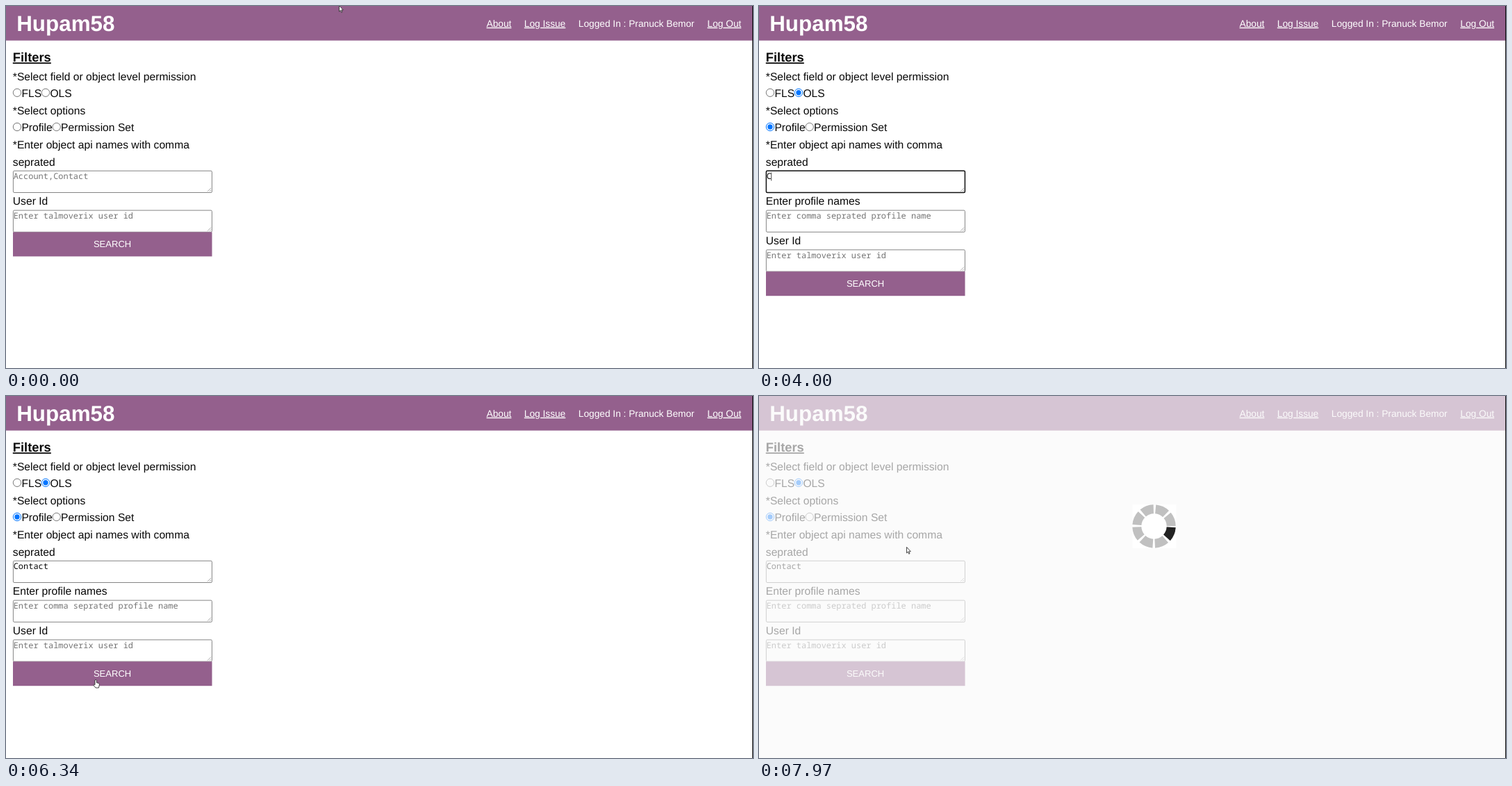
An HTML page that plays this animation: 1075 px wide and 521 px high, repeating every 8 s.

```html
<!DOCTYPE html>
<html lang="en">
<head>
<meta charset="utf-8">
<title>Permission filters</title>
<style>
  html, body { margin: 0; width: 100%; height: 100%; overflow: hidden; background: #fff; }
  svg { display: block; font: 15.66px "Liberation Sans", Arial, sans-serif; fill: #080808; text-rendering: geometricPrecision; }
  .title { font-size: 31.4px; font-weight: bold; fill: #fff; }
  .nav { font-size: 13.71px; fill: #fff; }
  .heading { font-size: 18.33px; font-weight: bold; }
  .link { text-decoration: underline; }
  .button { font-size: 13.05px; fill: #fff; text-anchor: middle; }
  .mono { font: 11.97px "Noto Sans Mono", "DejaVu Sans Mono", monospace; fill: #757575; }
  .typed { fill: #080808; }
  .box { fill: #fff; stroke: #858585; }
  .focus .box { stroke: #101010; stroke-width: 1.5; }
  .grip { stroke: #999; stroke-width: .8; }
  .purple { fill: #94608d; }
  .radio { fill: #fff; stroke: #767676; }
  .radio.hover { stroke: #4f4f4f; }
  .radio.on { stroke: #0075ff; }
  .radio.on.hover { stroke: #005cc8; }
  .dot { fill: #0075ff; visibility: hidden; }
  .on + .dot { visibility: visible; }
  .on.hover + .dot { fill: #005cc8; }
  #pointer path { fill: #fff; stroke: #333; stroke-width: .9; stroke-linejoin: round; }
  #pointer #beam { fill: none; }
</style>
</head>
<body>
<svg width="1075" height="521" viewBox="0 0 1075 521">
  <rect class="purple" width="1074" height="49.7"/>
  <text class="title" x="15.2" y="36.2">Hupam58</text>
  <g class="nav">
    <text class="link" x="691.5" y="29.8">About</text>
    <text class="link" x="745.8" y="29.8">Log Issue</text>
    <text x="823.8" y="29.8">Logged In : Pranuck Bemor</text>
    <text class="link" x="1009.3" y="29.8">Log Out</text>
  </g>
  <text class="heading link" x="9.8" y="80.3">Filters</text>
  <g id="form"></g>
  <path id="caret" d="M0 239.5V251.5" stroke="#333" stroke-width=".9"/>

  <g id="loading">
    <rect width="1074" height="521" fill="#f9f9f9" opacity=".66"/>
    <rect x="537.5" y="156" width="63" height="63" fill="#fff"/>
    <g transform="translate(568.5 187.5)" fill="none" stroke-width="13" stroke-dashoffset="-1.5">
      <circle r="24.7" stroke="#c0c0c0" stroke-dasharray="16.4 3"/>
      <circle id="spoke" r="24.7" stroke="#222" stroke-dasharray="16.4 200"/>
    </g>
  </g>
  <rect x="1074" width="1" height="521"/>

  <g id="pointer">
    <path id="arrow" d="M.5 .5V9L2.4 7.2 3.7 10.3 5 9.7 3.7 6.8H6.3Z"/>
    <path id="hand" d="M1 1Q2.2-.4 3.4 1V4.6L6.6 5.4Q7.8 6.4 7.2 8.6L6.4 12H2L-1.2 8Q-1 6.4 1 7.6Z"/>
    <path id="beam" d="M-1.5-5H1.5M0-5V5M-1.5 5H1.5"/>
  </g>
</svg>
<script>
const LOOP = 8000, STEP = 95;
const LEFT = 9.8, LINE = 24.63, BLOCK = 56.8, CHAR = 7.18;
const FIELD_TOP = 236.8, FIELD_HEIGHT = 32;
const ENTRY = "Contact";

// When things happen, in ms
const PICK_OLS = 1675, PICK_PROFILE = 2320, FOCUS = 2910, TYPE = 4000, TYPE_ON = 4600,
  LAST_KEY = 5170, CARET_OFF = 5670, POINTER_BACK = 5860, PRESS = 6240, LOAD = 6430;

// Pointer moves: start, end, x, y
const moves = [
  [0, 0, 479, -1], [415, 700, 125, 77], [915, 1485, 56, 124], [1675, 1770, 54, 172],
  [1770, 2130, 47, 177], [2620, 2910, 62, 246], [5770, 6150, 127, 408],
  [6430, 6900, 211, 241], [6900, 7480, 212, 217]
];

const $ = id => document.getElementById(id);
const show = (id, on) => $(id).style.visibility = on ? "visible" : "hidden";
const shift = (id, x, y) => $(id).setAttribute("transform", `translate(${x} ${y})`);
const text = (x, y, content, attrs = "") => `<text x="${x}" y="${y}" ${attrs}>${content}</text>`;
const line = (row, content, x = LEFT) => text(x, 106.5 + row * LINE, content);

function radio(id, x, row, label) {
  const at = `cx="${x}" cy="${100.1 + row * LINE}"`;
  return `<circle class="radio" id="${id}" ${at} r="5.7"/><circle class="dot" ${at} r="3.7"/>`
    + line(row, label, x + 6.4);
}

function field(id, hint) {
  return `<g id="${id}"><rect class="box" x="10.4" y="${FIELD_TOP + .5}" width="286" height="31.2" rx="1.5"/>
    <path class="grip" d="M290 267l5-5M293 267l2-2"/>${text(10.7, 249, hint, 'class="mono"')}</g>`;
}

const labelled = (id, label, hint, extra = "") =>
  `<g id="${id}">${text(LEFT, 229.4, label)}${field(id + "Field", hint)}${extra}</g>`;

$("form").innerHTML =
  line(0, "*Select field or object level permission")
  + radio("fls", 16, 1, "FLS") + radio("ols", 57, 1, "OLS")
  + line(2, "*Select options")
  + radio("profile", 16, 3, "Profile") + radio("set", 72.7, 3, "Permission Set")
  + line(4, "*Enter object api names with comma") + line(5, "seprated")
  + field("objects", "")
  + labelled("names", "Enter profile names", "Enter comma seprated profile name")
  + labelled("user", "User Id", "Enter talmoverix user id",
    `<rect class="purple" x="10" y="268.6" width="286.5" height="35"/>` + text(153.1, 290.2, "SEARCH", 'class="button"'));
shift("names", 0, BLOCK);

const entry = $("objects").querySelector("text");

function pointerAt(t) {
  let [, , x, y] = moves[0];
  for (const [start, end, toX, toY] of moves.slice(1)) {
    const p = Math.min(1, Math.max(0, (t - start) / (end - start)));
    const eased = p * (2 - p) * .5 + p * .5;
    x += (toX - x) * eased;
    y += (toY - y) * eased;
  }
  return [x, y];
}

function typedCount(t) {
  if (t < TYPE) return 0;
  if (t >= LAST_KEY) return ENTRY.length;
  return t < TYPE_ON ? 1 : Math.min(6, 2 + Math.floor((t - TYPE_ON) / 68));
}

function setRadio(id, on, hover) {
  $(id).classList.toggle("on", on);
  $(id).classList.toggle("hover", hover);
}

function render(t) {
  const [x, y] = pointerAt(t - (t + 60) % STEP);
  const expanded = t >= PICK_PROFILE, loading = t >= LOAD;
  const focused = t >= FOCUS && t < PRESS;
  const over = (left, right, top, height) => x > left && x < right && y > top && y < top + height;

  setRadio("ols", t >= PICK_OLS, over(51, 95, 117, 15));
  setRadio("profile", expanded, over(10, 67, 166, 17));
  show("names", expanded);
  shift("user", 0, expanded ? 2 * BLOCK : BLOCK);

  const count = typedCount(t);
  entry.textContent = count ? ENTRY.slice(0, count) : "Account," + ENTRY;
  entry.classList.toggle("typed", count > 0);
  $("objects").classList.toggle("focus", focused);
  shift("caret", 10.6 + count * CHAR, 0);
  show("caret", focused && t < CARET_OFF);

  show("loading", loading);
  $("spoke").setAttribute("transform", `rotate(${45 * Math.floor((t - 6900) / 88 + 4)})`);

  const onField = [0, 1, 2].some(i => over(10, 297, FIELD_TOP + i * BLOCK, FIELD_HEIGHT));
  const shape = loading ? "arrow" : y > 382 ? "hand" : onField ? "beam" : "arrow";
  const visible = t < TYPE || t >= POINTER_BACK;
  for (const id of ["arrow", "hand", "beam"]) show(id, visible && id === shape);
  shift("pointer", x, y);
}

function tick() {
  render(performance.now() % LOOP);
  requestAnimationFrame(tick);
}
tick();
</script>
</body>
</html>
```
